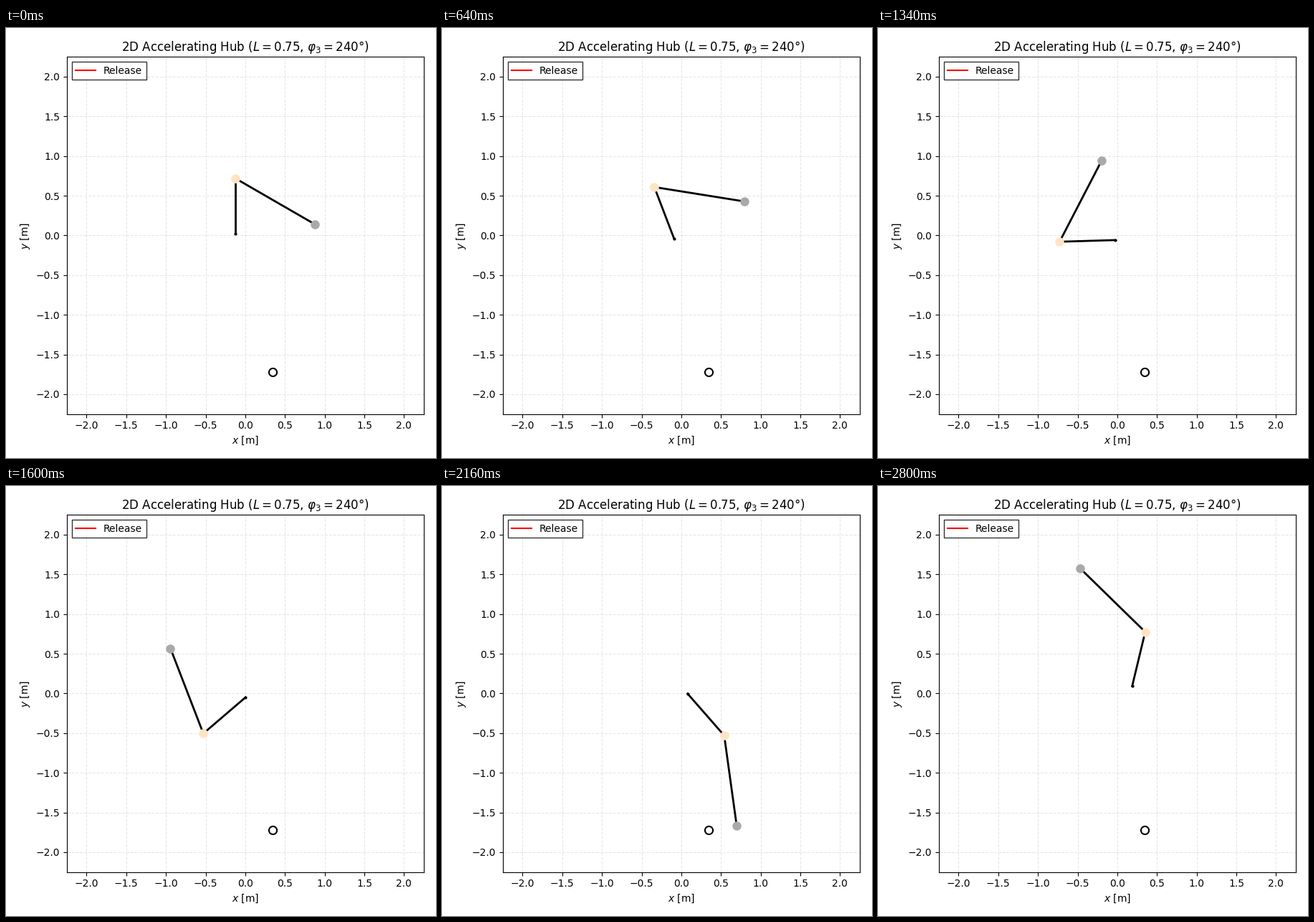
A matplotlib script that plays this animation: 600x600 px, repeating every 2.82 s.

```python
import numpy as np
import matplotlib.pyplot as plt
from matplotlib.animation import FuncAnimation

FRAMES, STEP_MS = 141, 20
SIZE, SIDE = 600, 498.4      # stage and plot box [px]
LEFT, BOTTOM = 84.7, 61.4    # plot box corner [px]
ARM, ROD = 0.70, 1.15        # link lengths [m]
ALPHA = 102.2                # angular acceleration while locked [deg/s^2]
PHI3 = 240.0                 # locked joint angle [deg]
T_FREE = 1.23                # the joint starts to open [s]

# Joint opening and arm lag after unlocking, both of the form s^2 * q(s)
S = np.array([0.39, 0.63, 0.93, 1.23, 1.47, 1.57])
opening = np.polyfit(S, np.array([11.8, 35.7, 86.9, 142.2, 172.7, 178.8]) / S**2, 4)
lag = np.polyfit(S, np.array([0.3, 3.8, 17.4, 35.6, 49.5, 53.8]) / S**2, 4)


def polar(r, deg):
    a = np.radians(deg)
    return r * np.array([np.cos(a), np.sin(a)])


def pose(t):
    """Positions of hub, elbow and tip at time t."""
    s = max(t - T_FREE, 0.0)
    theta = 90 + ALPHA / 2 * t**2 - s**2 * np.polyval(lag, s)
    beta = theta + PHI3 + s**2 * np.polyval(opening, s)
    hub = np.array([-0.123 + 0.0352 * t + 0.0271 * t**2,
                    0.0175 - 0.1345 * t + 0.0578 * t**2])
    elbow = hub + polar(ARM, theta)
    return hub, elbow, elbow + polar(ROD, beta)


fig = plt.figure(figsize=(SIZE / 100, SIZE / 100), dpi=100)
ax = fig.add_axes([v / SIZE for v in (LEFT, BOTTOM, SIDE, SIDE)])
ax.set(xlim=(-2.25, 2.25), ylim=(-2.25, 2.25), xlabel="$x$ [m]", ylabel="$y$ [m]")
ax.set_title(r"2D Accelerating Hub ($L=0.75$, $\varphi_3=240°$)")
ticks = np.arange(-2, 2.1, 0.5)
ax.set_xticks(ticks)
ax.set_yticks(ticks)
ax.grid(ls="--", alpha=0.3)

ax.plot([], [], color="red", label="Release")
ax.legend(loc="upper left", fancybox=False, edgecolor="black")

ax.plot(0.343, -1.721, "o", ms=8, mfc="white", mec="black", mew=1.5)
arm, rod = [ax.plot([], [], color="black", lw=2)[0] for _ in range(2)]
joints = [ax.plot([], [], "o", color=c, ms=m)[0]
          for c, m in (("black", 2), ("bisque", 8), ("darkgray", 8))]


def update(i):
    points = pose(i * STEP_MS / 1000)
    arm.set_data(*np.transpose(points[:2]))
    rod.set_data(*np.transpose(points[1:]))
    for joint, (x, y) in zip(joints, points):
        joint.set_data([x], [y])
    return [arm, rod, *joints]


anim = FuncAnimation(fig, update, frames=FRAMES, interval=STEP_MS,
                     repeat=True, repeat_delay=0)
plt.show()
```
